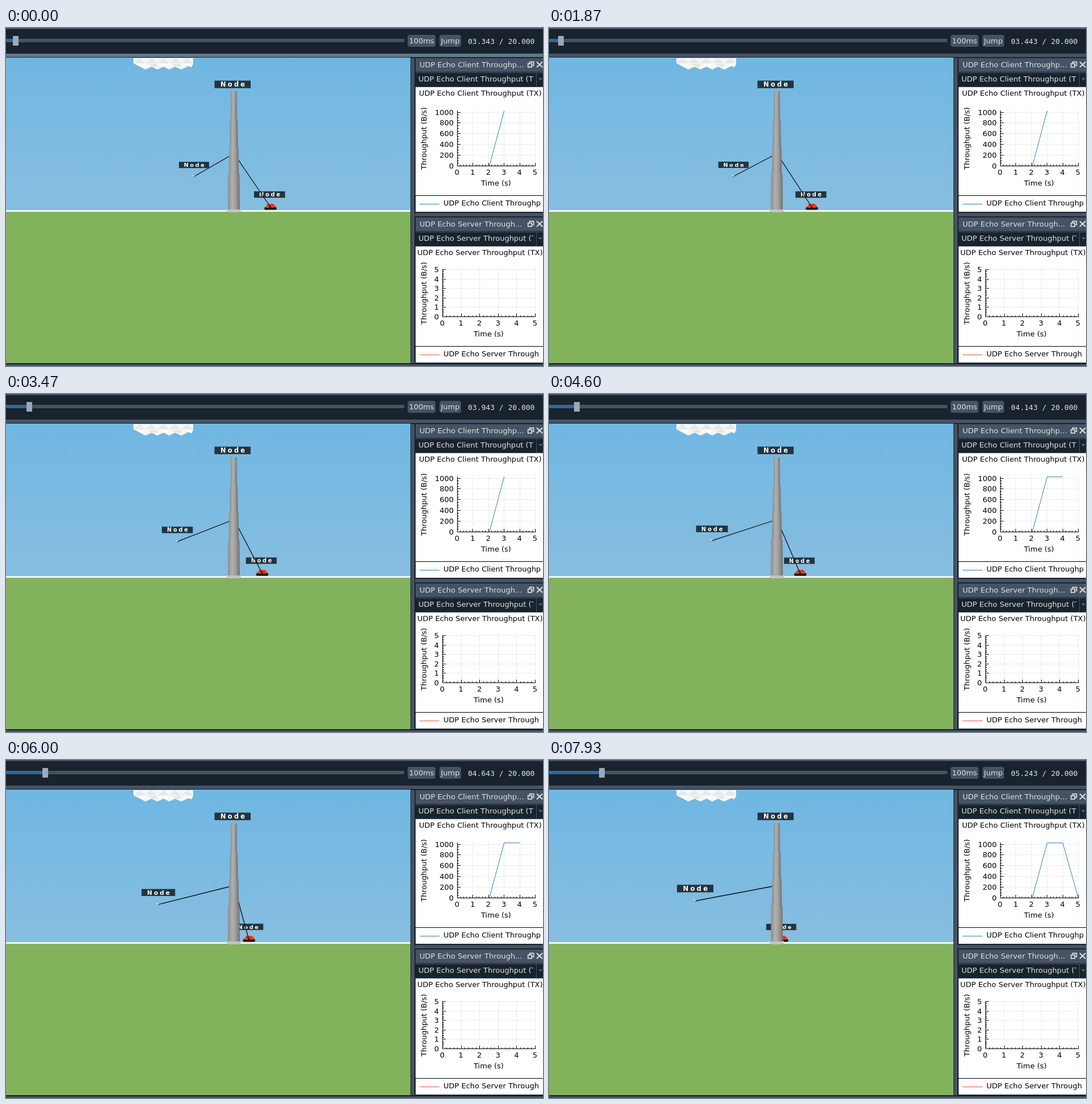
An HTML page with a canvas that plays this animation: 944 by 594 pixels, repeating every 8 s.

```html
<!DOCTYPE html>
<html lang="en">
<head>
<meta charset="utf-8">
<title>Network simulation playback</title>
<style>
html, body { margin: 0; width: 100%; height: 100%; overflow: hidden; background: #19232d; }
canvas { display: block; }
</style>
</head>
<body>
<canvas id="stage" width="944" height="594"></canvas>
<script>
const ctx = document.getElementById('stage').getContext('2d');
const LOOP = 8000;
const DARK = '#19232d', PANEL = '#455364', HOVER = '#60798b', LIGHT = '#e0e1e3', HANDLE = '#9da9b5';
const SANS = '13px "DejaVu Sans", sans-serif';
const MONO = '13px "DejaVu Sans Mono", monospace';

// [ms, simulation step, step shown by the 3D view]; one step is 100 ms of simulated time
const timeline = [
  [0, 0, 0], [1870, 1, 1], [2200, 2, 2], [2530, 4, 3], [2930, 5, 4], [3400, 6, 4], [3470, 6, 5],
  [4200, 7, 7], [4600, 8, 8], [4870, 9, 9], [5200, 10, 10], [5470, 11, 11], [5730, 12, 12],
  [6000, 13, 13], [6330, 14, 14], [6670, 15, 15], [7000, 16, 15], [7330, 17, 17],
  [7670, 18, 18], [7930, 19, 19]
];

function rect(x, y, w, h, color) {
  ctx.fillStyle = color;
  ctx.fillRect(x, y, w, h);
}

function poly(points, color) {
  ctx.beginPath();
  points.forEach(([x, y]) => ctx.lineTo(x, y));
  ctx.fillStyle = color;
  ctx.fill();
}

function path(points, color, width = 1) {
  ctx.beginPath();
  points.forEach(([x, y]) => ctx.lineTo(x, y));
  ctx.strokeStyle = color;
  ctx.lineWidth = width;
  ctx.stroke();
}

function text(str, x, y, color, align = 'left', font = SANS) {
  ctx.font = font;
  ctx.textAlign = align;
  ctx.fillStyle = color;
  ctx.fillText(str, x, y);
}

function clipped(x, y, w, h, draw) {
  ctx.save();
  ctx.beginPath();
  ctx.rect(x, y, w, h);
  ctx.clip();
  draw();
  ctx.restore();
}

function button(x, w, label) {
  ctx.beginPath();
  ctx.roundRect(x, 12, w, 21, 4);
  ctx.fillStyle = PANEL;
  ctx.fill();
  text(label, x + w / 2, 27, LIGHT, 'center');
}

function toolbar(step, hovered) {
  rect(0, 0, 944, 2, PANEL);
  rect(0, 45, 944, 6, hovered ? HOVER : PANEL);
  const x = Math.floor(12 + 4.05 * step);
  rect(0, 19, 700, 6, PANEL);
  rect(0, 19, x, 6, '#346792');
  ctx.beginPath();
  ctx.roundRect(x, 14, 10, 17, 1);
  ctx.fillStyle = HANDLE;
  ctx.fill();
  button(706, 49, '100ms');
  button(762, 38, 'Jump');
  const now = (3.343 + step / 10).toFixed(3).padStart(6, '0');
  text(now + ' / 20.000', 812, 28, LIGHT, 'left', MONO);
}

function nodeLabel(cx, top, w) {
  const h = w * 0.208;
  rect(cx - w / 2, top, w, h, '#22343f');
  const size = w * 0.18;
  ctx.letterSpacing = w * 0.051 + 'px';
  text('Node', cx - w * 0.335, top + h / 2 + size * 0.37, '#fff', 'left', `bold ${size}px "DejaVu Sans", sans-serif`);
  ctx.letterSpacing = '0px';
}

function cloud() {
  poly([[224, 53], [224, 62], [245, 73], [256, 68], [266, 73], [277, 68], [287, 73],
    [297, 68], [308, 73], [329, 63], [329, 53]], '#f6f6f6');
  for (let i = 0; i < 5; i++) {
    const x = 224 + 21 * i;
    poly([[x, 62], [x + 10.5, 53], [x + 21, 62]], '#e8e8e8');
    poly([[x + 5, 64], [x + 21, 63], [x + 18, 69]], i % 2 ? '#e4e4e4' : '#fff');
  }
}

function tower() {
  poly([[388, 318], [413, 318], [413, 322], [408, 324], [392, 324], [388, 322]], '#c4c4c4');
  // [top, bottom, half width at top, half width at bottom]
  [[256, 319, 10, 10.6], [208, 256, 8.2, 8.8], [162, 208, 6.7, 7.2], [111, 162, 5.1, 5.7]].forEach(([y0, y1, a, b]) => {
    const shade = ctx.createLinearGradient(400.5 - b, 0, 400.5 + b, 0);
    shade.addColorStop(0, '#8c8c8c');
    shade.addColorStop(0.35, '#afafaf');
    shade.addColorStop(0.6, '#a3a3a3');
    shade.addColorStop(1, '#707070');
    poly([[400.5 - a, y0], [400.5 + a, y0], [400.5 + b, y1], [400.5 - b, y1]], shade);
  });
}

function car(x) {
  poly([[x - 9, 314], [x + 8, 314], [x + 11, 316], [x + 10, 319.5], [x - 10, 319.5], [x - 11, 317]], '#161616');
  poly([[x - 9, 315], [x - 5, 309], [x + 5, 309], [x + 9, 313], [x + 8, 315.5], [x - 8, 316]], '#ee3b0e');
  rect(x - 5, 311, 9, 1, '#b82a08');
  rect(x - 2, 313, 3, 4, '#3a1408');
}

function drone(x, y) {
  path([[x - 4, y - 2], [x, y], [x + 4, y - 1]], '#e4e8ea', 1.2);
  path([[x - 2, y + 2], [x, y], [x + 2, y + 2]], '#59636a', 1);
}

function scene(s) {
  const sky = ctx.createLinearGradient(0, 53, 0, 320);
  sky.addColorStop(0, '#6fb7e2');
  sky.addColorStop(1, '#87bee0');
  rect(0, 52, 711, 537, sky);
  rect(0, 320, 711, 3, '#f2f8f5');
  rect(0, 323, 711, 266, '#82b35c');
  cloud();

  const carX = 463.3 - 2.9 * s;
  const droneX = 330.5 + s * (-6.371 + 0.0916 * s + 0.00211 * s * s);
  const droneY = 260.5 - 0.2 * s - 0.0255 * s * s;
  car(carX + 1.7);
  nodeLabel(carX, 287 + 0.05 * s, 54.5 - 0.09 * s);
  path([[401, 221], [carX + 0.5, 313]], '#0b0f12', 1.3);
  nodeLabel(droneX, 235.2 - 0.25 * s - 0.031 * s * s, 53 + 0.2 * s + 0.02 * s * s);
  drone(droneX + 1, droneY);
  path([[401, 220.5], [droneX + 1, droneY]], '#0b0f12', 1.3);
  tower();
  nodeLabel(398.3, 92.5, 63.5);
}

function dockHeader(y, title, choice) {
  rect(720, y, 224, 24, PANEL);
  text(title, 727, y + 16, LIGHT);
  ctx.strokeStyle = LIGHT;
  ctx.lineWidth = 1.7;
  ctx.strokeRect(917.7, y + 9.7, 6.5, 6);
  path([[920.5, y + 9], [920.5, y + 6.7], [927.5, y + 6.7], [927.5, y + 13], [925, y + 13]], LIGHT, 1.7);
  path([[933, y + 6.5], [943, y + 16]], LIGHT, 2);
  path([[943, y + 6.5], [933, y + 16]], LIGHT, 2);
  rect(720, y + 25, 224, 26, PANEL);
  rect(720, y + 26, 224, 24, DARK);
  clipped(720, y + 25, 207, 26, () => text(choice, 725, y + 41, LIGHT));
  rect(932, y + 26, 1, 24, PANEL);
  poly([[936, y + 35], [943, y + 35], [939.5, y + 39]], '#54687a');
}

function chart({ left, base, dx, dy, ticks, subs, title, titleX, titleY, data, color }) {
  const top = base - dy * 5 - (subs === 3 ? 2.5 : 0);
  const right = left + dx * 5;
  const gx = i => Math.round(left + dx * i) + 0.5;
  const gy = i => Math.round(base - dy * i) + 0.5;
  text(title, titleX, titleY, '#000');
  ctx.setLineDash([1, 2]);
  for (let i = 1; i <= 5; i++) {
    path([[gx(i), base], [gx(i), top]], '#c4c4c4');
    path([[left, gy(i)], [right, gy(i)]], '#c4c4c4');
  }
  ctx.setLineDash([]);
  if (data.length) {
    clipped(left, top - 1, right - left + 2, base - top + 2, () =>
      path(data.map(([x, y]) => [left + dx * x + 0.5, base - dy * y + 0.5]), color));
  }
  path([[gx(0), Math.round(top)], [gx(0), gy(0)], [right + 1, gy(0)]], '#000');
  for (let i = 0; i <= 5; i++) {
    path([[gx(i), base], [gx(i), base - 5]], '#000');
    path([[left, gy(i)], [left + 6, gy(i)]], '#000');
    text(i, left + dx * i, base + 16, '#000', 'center');
    text(i * ticks, left - 6, Math.round(base - dy * i) + 5, '#000', 'right');
    if (i === 5) break;
    for (let k = 1; k < 5; k++) path([[gx(i + k / 5), base], [gx(i + k / 5), base - 2]], '#000');
    for (let k = 1; k <= subs; k++) {
      const y = gy(i + k / (subs + 1));
      path([[left, y], [left + 3, y]], '#000');
    }
  }
  text('Time (s)', (left + right) / 2, base + 35, '#000', 'center');
  ctx.save();
  ctx.translate(739, Math.round((top + base) / 2));
  ctx.rotate(-Math.PI / 2);
  text('Throughput (B/s)', 0, 0, '#000', 'center');
  ctx.restore();
}

function legend(y, label, color, textEnd) {
  rect(719, y, 225, 1, '#000');
  rect(719, y, 1, 29, '#000');
  path([[727, y + 15.5], [762, y + 15.5]], color);
  clipped(769, y, textEnd - 769, 29, () => text(label, 769, y + 18, '#000'));
}

function docks(step) {
  const client = 'UDP Echo Client Throughput (TX)';
  const server = 'UDP Echo Server Throughput (TX)';
  const blue = '#2980b9', orange = '#f0551f';
  rect(720, 104, 224, 219, '#fff');
  rect(720, 384, 224, 204, '#fff');
  rect(719, 325, 225, 6, PANEL);
  dockHeader(53, 'UDP Echo Client Throughp...', client);
  dockHeader(333, 'UDP Echo Server Through...', server);

  const sent = [[2.05, 0], [3, 5.12]];
  if (step >= 7) sent.push([4, 5.12]);
  if (step >= 17) sent.push([5, 0]);
  chart({ left: 793, base: 242, dx: 27.4, dy: 18.9, ticks: 200, subs: 3,
    title: client, titleX: 726, titleY: 119, data: sent, color: blue });
  chart({ left: 767, base: 507, dx: 32.6, dy: 16.6, ticks: 1, subs: 4,
    title: server, titleX: 723, titleY: 399, data: [], color: orange });
  legend(294, client, blue, 940);
  legend(559, server, orange, 938);
}

function render(t) {
  const [, step, viewStep] = timeline.findLast(([start]) => t >= start);
  const during = (from, to) => t >= from && t < to;
  rect(0, 0, 944, 594, DARK);
  toolbar(step, during(0, 70));
  clipped(0, 52, 711, 537, () => scene(viewStep));
  rect(712, 53, 6, 536, during(1930, 2000) ? HOVER : PANEL);
  docks(step);
  rect(0, 591, 944, 3, during(2930, 3130) ? HOVER : PANEL);
}

const began = performance.now();
function tick() {
  render((performance.now() - began) % LOOP);
  requestAnimationFrame(tick);
}
tick();
</script>
</body>
</html>
```
